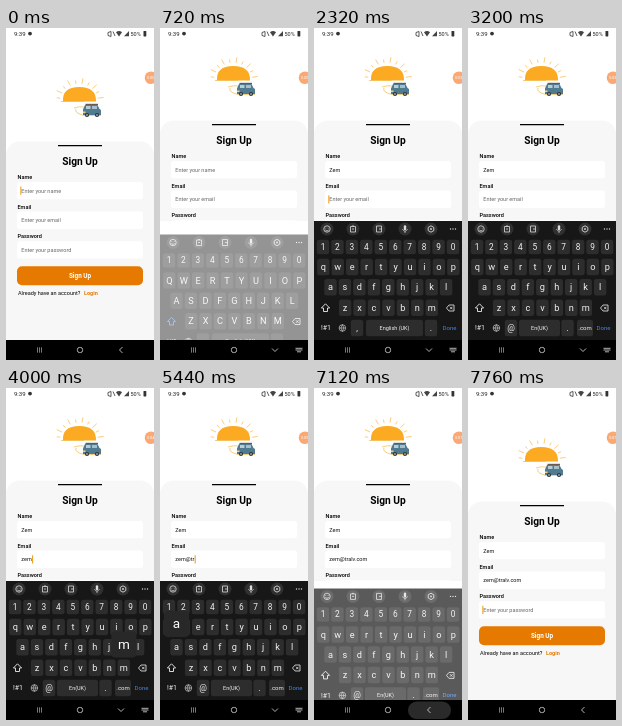
Recreate the animation shown at these times as an HTML page with a canvas. Size 148x332 px, loop 8 s.

```html
<!DOCTYPE html>
<html>
<head>
<meta charset="utf-8">
<style>
  html, body { margin: 0; width: 100%; height: 100%; overflow: hidden; background: #fff; }
  canvas { position: absolute; left: 0; top: 0; }
</style>
</head>
<body>
<canvas id="app"></canvas>
<canvas id="keyboard"></canvas>
<script>
const LOOP = 8000, W = 148, NAV_TOP = 312, KEYBOARD_TOP = 193, SHIFT = 21;
const ORANGE = '#e67a00', SUN = '#fbaa22', KEY = '#2d2d2d', BLUE = '#4285e8';
const FONT = 'Roboto, sans-serif';

// Each press: key, popup appears, text appears, popup leaves.
const namePresses = [
  ['Z', 1360, 1440, 1600], ['e', 1680, 1760, 1840], ['m', 1840, 1920, 2000]
];
const emailPresses = [
  ['z', 3600, 3680, 3760], ['e', 3760, 3840, 3920], ['m', 3920, 4000, 4160],
  ['@', 4720, 4880, 4960], ['t', 5120, 5200, 5200], ['r', 5360, 5440, 5440],
  ['a', 5440, 5520, 5600], ['l', 5600, 5680, 5760], ['v', 5760, 5840, 5840],
  ['.com', 6080, 6320, 6400]
];
const presses = [...namePresses, ...emailPresses];
const caretTimes = [
  [[0, 320], [800, 1280], [1440, 2320]],
  [[2320, 2800], [3440, 4240], [4720, 6320], [6400, 6880]],
  [[7680, LOOP]]
];

const ramp = (t, a, b) => Math.min(1, Math.max(0, (t - a) / (b - a)));
const within = (t, a, b) => t >= a && t < b;
const typed = (list, t) => list.filter(p => t >= p[2]).map(p => p[0]).join('');

let c;
function makeLayer(id, height) {
  const canvas = document.getElementById(id), scale = window.devicePixelRatio || 1;
  canvas.width = W * scale;
  canvas.height = height * scale;
  canvas.style.width = W + 'px';
  canvas.style.height = height + 'px';
  const context = canvas.getContext('2d');
  context.scale(scale, scale);
  return context;
}
const app = makeLayer('app', 332), board = makeLayer('keyboard', NAV_TOP);

function box(x, y, w, h, color, r = 0) {
  c.fillStyle = color;
  c.beginPath();
  c.roundRect(x, y, w, h, r);
  c.fill();
}
function text(s, x, y, size, color, align = 'left', weight = 400) {
  c.font = `${weight} ${size}px ${FONT}`;
  c.fillStyle = color;
  c.textAlign = align;
  c.fillText(s, x, y);
}
function path(d, color, width = 0.8) {
  c.strokeStyle = color;
  c.lineWidth = width;
  c.stroke(new Path2D(d));
}
function shape(d, color) {
  c.fillStyle = color;
  c.fill(new Path2D(d));
}
function disc(x, y, r, color) {
  c.fillStyle = color;
  c.beginPath();
  c.arc(x, y, r, 0, 7);
  c.fill();
}

function drawPicture() {
  shape('M57 73.5Q56 59 73.3 59Q90.5 59 90 73.5Z', SUN);
  for (let i = 0; i < 10; i++) {
    const a = Math.PI * (1.05 + i * 0.1), end = i % 2 ? 25 : 22.5;
    const x = Math.cos(a), y = Math.sin(a) * 0.92;
    path(`M${73 + 19 * x} ${73 + 19 * y}L${73 + end * x} ${73 + end * y}`, SUN, 0.6);
  }
  path('M55 73.5H78M68 80Q74 78 78 79M70 81Q68 85 78 87.5H95', '#f0b94c', 0.7);
  shape('M79 77H91.5L93.5 81L95 82V87H77V81.5Z', '#4f7a90');
  box(79.5, 75.8, 12.5, 1.2, '#6b5a4d');
  box(80, 78, 4.5, 3, '#b9ced4');
  box(86, 78, 5, 3, '#a5c0ca');
  box(77, 83.5, 2.5, 1.5, '#f5ce72');
  [81, 91].forEach(x => { disc(x, 87, 2.1, '#2b3338'); disc(x, 87, 0.9, '#a4adb0'); });
}

function drawField(index, label, hint, value, t) {
  const y = 154 + index * 29.6;
  text(label, 11.5, y - 3, 5.5, '#000', 'left', 500);
  box(11, y, 126, 17.3, '#fff', 2.5);
  text(value || hint, 15.3, y + 10.8, 5.5, value ? '#111' : '#666');
  if (caretTimes[index].some(([a, b]) => within(t, a, b))) {
    const x = value ? 15.6 + c.measureText(value).width : 14.3;
    box(x, y + 4.6, 1.1, 8.2, '#f0a21c');
  }
}

function drawStatus() {
  text('9:39', 8, 8, 6, '#222');
  disc(24, 5.6, 1.9, '#333');
  path('M102 4.5V7.5L105 8.5V3.5ZM107 3.5L109 8', '#333', 0.8);
  shape('M110 4.2Q113 2 116 4.2L113 8.5Z', '#444');
  shape('M118 8.3L123 3V8.3Z', '#444');
  text('50%', 124.5, 8, 5.5, '#222');
  box(137.5, 3, 2.8, 5.4, '#333', 0.6);
}

function drawRecorder(t) {
  disc(145, 49.8, 6.3, '#fba872');
  text('0:0' + Math.floor(t / 1000), 141, 51.2, 3.8, '#fff');
}

function drawNav(t, keyboardOpen) {
  const ink = '#c8c8c8';
  box(0, NAV_TOP, W, 20, '#000');
  c.globalAlpha = Math.min(ramp(t, 6840, 6960), 1 - ramp(t, 7200, 7440));
  box(94, 313.5, 43, 17.5, '#2a2a2a', 9);
  c.globalAlpha = 1;
  path('M31.5 319.3V324.7M33.5 319.3V324.7M35.5 319.3V324.7', ink, 0.6);
  c.strokeStyle = ink;
  c.lineWidth = 0.9;
  c.beginPath();
  c.roundRect(71.4, 319.4, 5.2, 5.2, 2.2);
  c.stroke();
  path(keyboardOpen ? 'M112 320.5L115 323.5L118 320.5' : 'M116.5 319L113.5 322L116.5 325', ink, 0.9);
  if (keyboardOpen) path('M135.5 320.3H142.5M135.5 322H142.5M137 323.8H141', ink, 0.9);
}

function drawApp(t) {
  c = app;
  const resized = within(t, 720, 7200);
  box(0, 0, W, 332, '#fff');
  c.save();
  if (resized) {
    c.beginPath();
    c.rect(0, 0, W, KEYBOARD_TOP);
    c.clip();
    c.translate(0, -SHIFT);
  }
  drawPicture();
  box(0, 113.5, W, 240, '#f7f7f7', 14);
  box(52, 117, 44, 1.3, '#000');
  text('Sign Up', 74, 137.3, 10.2, '#000', 'center', 700);
  drawField(0, 'Name', 'Enter your name', typed(namePresses, t), t);
  drawField(1, 'Email', 'Enter your email', typed(emailPresses, t), t);
  drawField(2, 'Password', 'Enter your password', '', t);
  box(11, 238.2, 126, 19, ORANGE, 5);
  text('Sign Up', 74, 250.2, 6.4, '#fff', 'center', 700);
  text('Already have an account?', 12, 266.8, 5.5, '#000');
  text('Login', 78, 266.8, 5.5, ORANGE, 'left', 700);
  c.restore();
  drawStatus();
  drawRecorder(t);
  drawNav(t, within(t, 720, 7040));
}

function keyList(email) {
  const keys = [];
  const addRow = (letters, x, y) =>
    [...letters].forEach((label, i) => keys.push({ label, x: x + i * 14.45, y, w: 12.4 }));
  addRow('1234567890', 9, 219);
  addRow('qwertyuiop', 9.3, 239);
  addRow('asdfghjkl', 16.5, 259.2);
  addRow('zxcvbnm', 31.1, 279.7);
  const add = (label, x, w, size) => keys.push({ label, x, y: 300, w, size });
  add('!#1', 12, 0, 7);
  add(email ? '@' : ',', 43, 12.4, 8.5);
  if (email) {
    add('En(UK)', 71.5, 41, 5.5);
    add('.', 99.5, 12.4, 9);
    add('.com', 117, 16, 6);
  } else {
    add('English (UK)', 80.5, 57, 5.5);
    add('.', 117, 12.4, 9);
  }
  add('Done', 135.5, 0, 6);
  return keys;
}

function drawToolbar() {
  [13, 39, 65, 91, 117].forEach(x => disc(x, 201, 6.5, '#303030'));
  const ink = '#ddd';
  path('M16.2 201A3.2 3.2 0 1 1 9.8 201A3.2 3.2 0 1 1 16.2 201M11.3 202Q13 204 14.7 202M11.8 199.8V200.5M14.2 199.8V200.5', ink);
  path('M36.5 198.5H41.5V204H36.5ZM38 198H40M38 201H40', ink);
  path('M62.5 198H67.5V204H62.5ZM65 201H67.5', ink);
  box(89.8, 197.2, 2.4, 5, ink, 1.2);
  path('M88.4 201Q91 205.5 93.6 201M91 203.2V205', ink, 0.7);
  path('M117 197.8L119.8 199.4V202.6L117 204.2L114.2 202.6V199.4Z', ink, 0.9);
  disc(117, 201, 0.9, ink);
  [136.5, 139, 141.5].forEach(x => disc(x, 201, 0.7, ink));
}

function drawKeys(keys, upper) {
  for (const { label, x, y, w, size } of keys) {
    const shown = upper && /^[a-z]$/.test(label) ? label.toUpperCase() : label;
    const h = y === 219 ? 14.5 : 16.5;
    if (w) box(x - w / 2, y - h / 2, w, h, KEY, 2.5);
    const fontSize = size || (y === 219 ? 8.3 : 9.2);
    text(shown, x, y + fontSize * 0.34, fontSize, label === 'Done' ? BLUE : '#f2f2f2', 'center');
  }
  path('M11.5 275.8L15.6 280H13.5V283.5H9.5V280H7.4Z', upper ? BLUE : '#eee', 0.9);
  path('M132.5 280L135 277H140V283H135ZM136 278.8L138.5 281.3M138.5 278.8L136 281.3', '#eee');
  path('M31.7 300A3.3 3.3 0 1 1 25.1 300A3.3 3.3 0 1 1 31.7 300M25.1 300H31.7M28.4 296.7Q25.5 300 28.4 303.3Q31.3 300 28.4 296.7', '#ddd', 0.6);
}

function drawPopups(keys, t) {
  for (const [label, from, , until] of presses) {
    if (!within(t, from, until)) continue;
    const key = keys.find(k => k.label === label.toLowerCase());
    const y = key.y - 23.7, wide = label.length > 1;
    const w = wide ? 32 : 25, size = wide ? 10 : 13.5;
    box(key.x - w / 2, y - 12.5, w, 26, '#282828', 4);
    text(label, key.x, y + size * 0.34, size, '#fff', 'center');
  }
}

function drawKeyboard(t) {
  c = board;
  const hidden = Math.max(ramp(t, 7050, 7290), 1 - ramp(t, 620, 840));
  c.clearRect(0, 0, W, NAV_TOP);
  c.canvas.style.opacity = 1 - hidden;
  if (hidden === 1) return;

  c.save();
  c.translate(0, 25 * hidden);
  box(0, KEYBOARD_TOP, W, 125, '#171717');
  drawToolbar();
  const keys = keyList(t >= 2640);
  drawKeys(keys, t < 1600 || within(t, 2640, 3120));
  drawPopups(keys, t);
  c.restore();
}

const start = performance.now();
function frame() {
  const t = (performance.now() - start) % LOOP;
  drawApp(t);
  drawKeyboard(t);
  requestAnimationFrame(frame);
}
frame();
</script>
</body>
</html>
```
